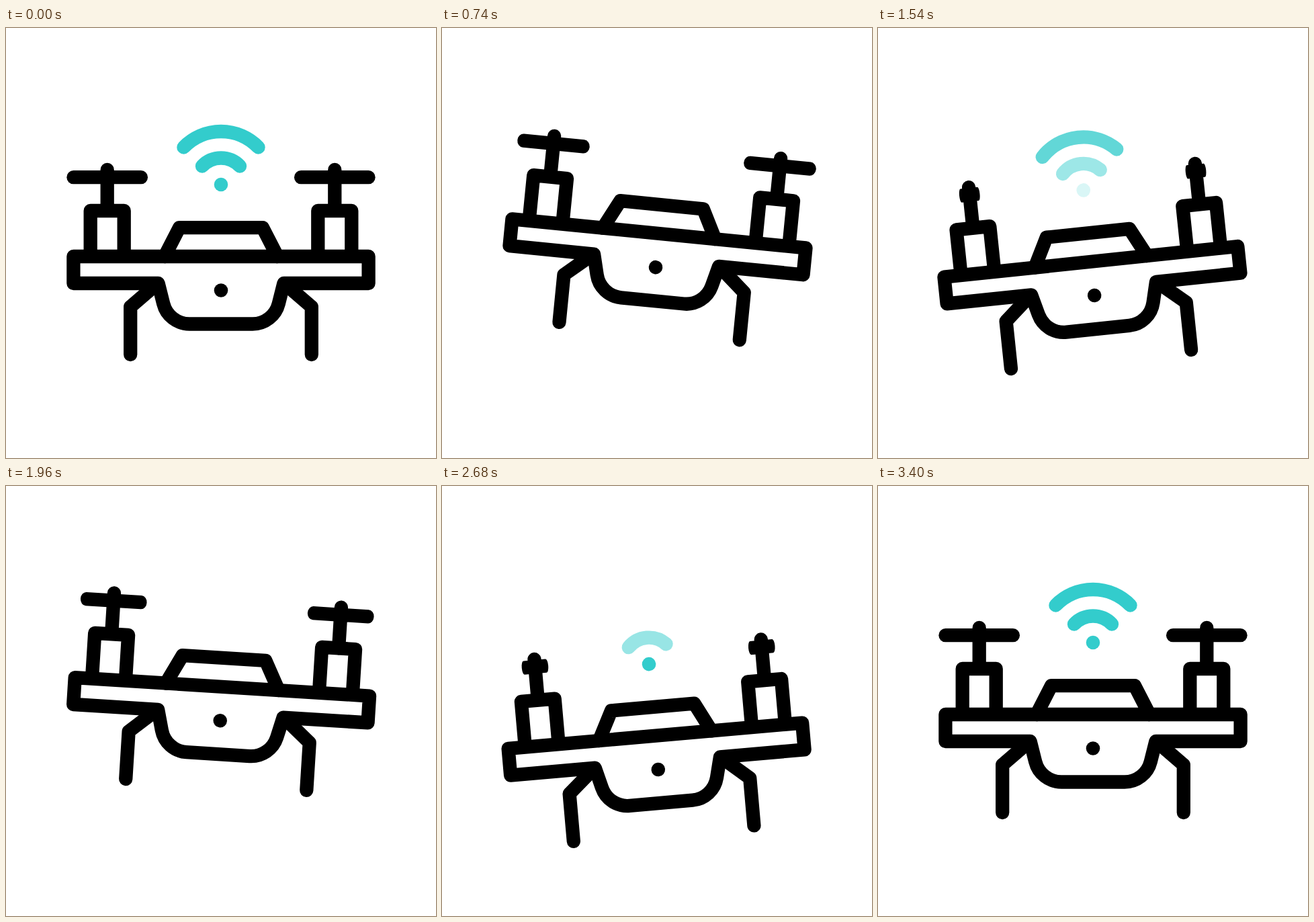
An HTML page for the animation above (3.6 s loop, 640 by 640 pixels).

```html
<!DOCTYPE html>
<html lang="en">
<head>
<meta charset="utf-8">
<title>Drone</title>
<style>
  html, body { margin: 0; width: 100%; height: 100%; overflow: hidden; background: #fff; }
  svg { display: block; width: 100%; height: 100%; }
  .line { fill: none; stroke: #000; stroke-width: 20.3; stroke-linecap: round; stroke-linejoin: round; }
  .signal { fill: none; stroke: #3cc; stroke-width: 20.4; stroke-linecap: round; }
  .signal circle { fill: #3cc; stroke: none; }
</style>
</head>
<body>
<svg viewBox="0 0 640 640">
  <defs>
    <path id="motor" d="M-25 337V272H25V337M0 211V272"/>
    <path id="leg" d="M-100 385L-134.800 415V486"/>
  </defs>
  <g id="drone">
    <g class="line">
      <path d="M100.400 340H539.600V380H413.400L405.800 410.200A40 40 0 0 1 367 440.500H273A40 40 0 0 1 234.200 410.200L226.600 380H100.400Z"/>
      <path d="M236 340L258 297.200H382L404 340"/>
      <use href="#leg" x="320"/>
      <use href="#leg" transform="translate(320) scale(-1 1)"/>
      <use href="#motor" x="150.700"/>
      <use href="#motor" x="489.300"/>
      <g transform="translate(150.700 222.200)"><path class="blade" d="M-50.200 0H50.200"/></g>
      <g transform="translate(489.300 222.200)"><path class="blade" d="M-50.200 0H50.200"/></g>
    </g>
    <circle cx="320" cy="390.500" r="10.300"/>
    <g class="signal">
      <circle class="wave" cx="320" cy="233" r="10.300"/>
      <path class="wave" d="M292 205.500A38.700 38.700 0 0 1 348 205.500"/>
      <path class="wave" d="M264.500 177.500A77.300 77.300 0 0 1 375.500 177.500"/>
    </g>
  </g>
</svg>
<script>
  const LOOP = 3600, STEP = 20, START = 200, END = 3400;
  const drone = document.getElementById('drone');
  const blades = document.querySelectorAll('.blade');
  const waves = document.querySelectorAll('.wave');

  const ease = u => u * u * (3 - 2 * u);
  const ramp = (t, start, length) => Math.min(1, Math.max(0, (t - start) / length));

  // Eases from rest through alternating extremes and back to rest.
  function swing(t, turns, first, second) {
    let value = 0, from = START;
    [...turns, END].forEach((to, i) => {
      const next = to === END ? 0 : i % 2 ? second : first;
      if (t > from) value += (next - value) * ease(ramp(t, from, to - from));
      from = to;
    });
    return value;
  }

  const tiltTurns = [1, 2, 3, 4].map(i => START + 650 * i);
  const liftTurns = [600, 1300, 1920, 2600];
  const tilt = t => swing(t, tiltTurns, 6.1, -6.1);
  const lift = t => swing(t, liftTurns, -42, 32.5);

  // A blade seen edge-on narrows to a quarter; it spins a little faster at first.
  function bladeWidth(t) {
    if (t <= START || t >= END) return 1;
    const phase = ((t - START) / 125 + 0.76 * ramp(t, START, 730)) % 1;
    return 1 - 0.75 * ease(2 * Math.min(phase, 1 - phase));
  }

  // The waves go out and come back twice, from the dot outwards.
  function waveOpacity(t, i) {
    return 1 - ramp(t, 200 + 30 * i, 120) + ramp(t, 860 + 160 * i, 205)
             - ramp(t, 1295 + 88 * i, 300) + ramp(t, 2060 + 500 * i, 240);
  }

  function draw(now) {
    const t = Math.floor((now % LOOP) / STEP) * STEP;
    drone.setAttribute('transform', `translate(0 ${lift(t)}) rotate(${tilt(t)} 320 370)`);
    const width = bladeWidth(t);
    blades.forEach(b => b.setAttribute('transform', `scale(${width} 1)`));
    waves.forEach((w, i) => w.setAttribute('opacity', waveOpacity(t, i)));
  }

  const begin = performance.now();
  function tick() {
    draw(performance.now() - begin);
    requestAnimationFrame(tick);
  }
  tick();
</script>
</body>
</html>
```
